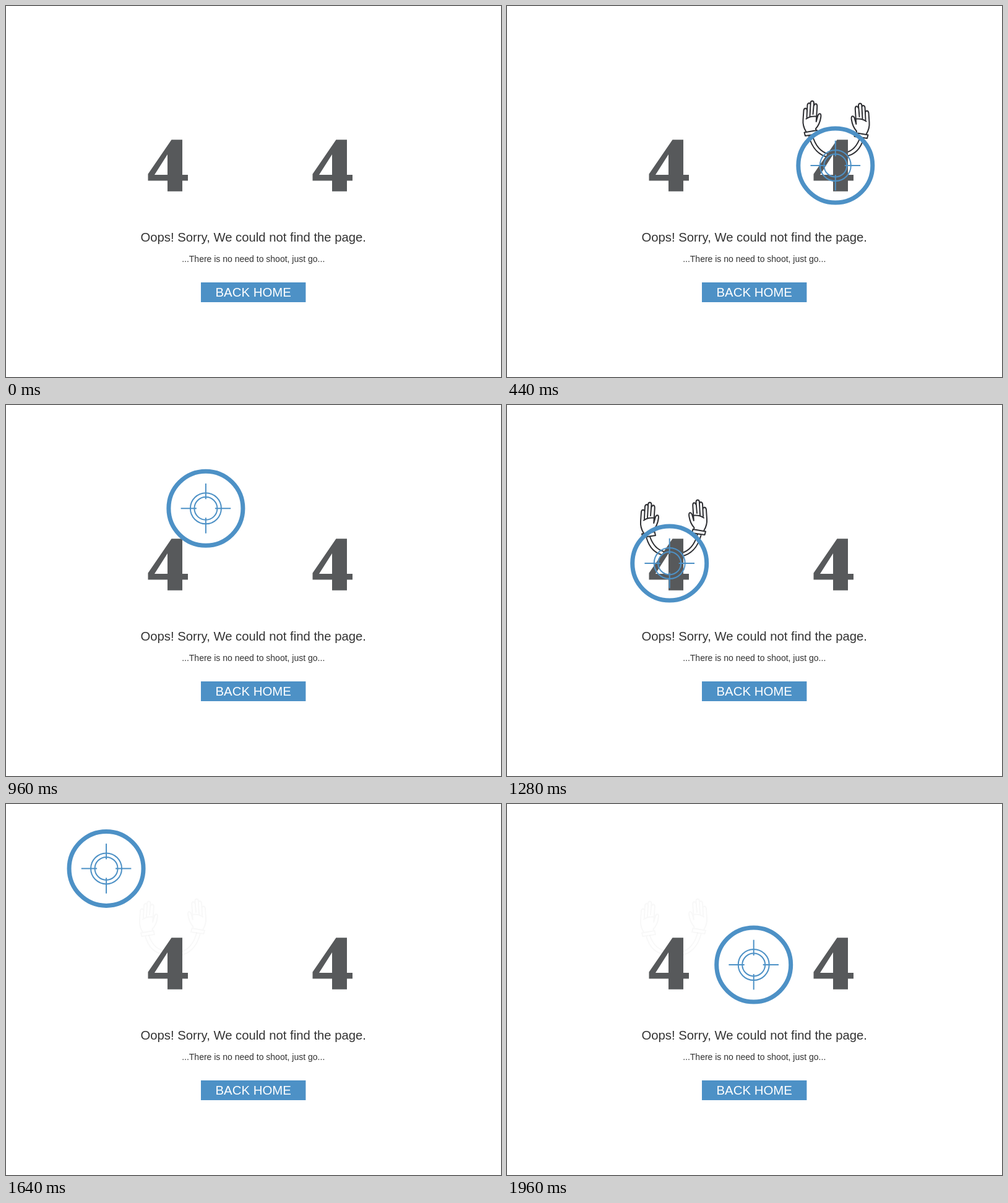
Write an HTML page with a canvas that moves like this. It is 800x600 px and loops after 4 s.

```html
<!DOCTYPE html>
<html lang="en">
<head>
<meta charset="utf-8">
<title>Page not found</title>
<style>
  html, body { margin: 0; width: 100%; height: 100%; overflow: hidden; background: #fff; }
  canvas { display: block; }
</style>
</head>
<body>
<canvas id="stage" width="800" height="600"></canvas>
<script>
const ctx = document.getElementById('stage').getContext('2d');
const LOOP = 4000, STEP = 40;
const BLUE = '#4d91c6', GREY = '#57595b', INK = '#2e2f33';
const FONT = '"Liberation Sans", Arial, sans-serif';

const four = new Path2D(
  'M267.5 216.3H285V273H294V282.5H285V299.8H261V282.5H229.5V271.8Z' +
  'M261 240L240 273H261Z');

const hand = new Path2D(
  'M483 202.5C479 196 478 190 478.5 184L479.5 169Q480 165.5 482.5 165.5Q485 166 485 169L484.5 180' +
  'M485 169L485.5 160Q486 157 488.5 157Q490.7 157.5 490.5 160L489.5 178' +
  'M490.5 160L490.7 156Q491.3 153.5 493.5 153.5Q496 154 496 157L494.5 175' +
  'M496 161Q497.5 157.7 499.5 158.2Q501.5 159 501.2 163L499.7 187' +
  'M483.5 182.5Q489 178 498.5 178.5' +
  'M499.7 187L502.5 177Q504 173.5 506.5 174.5Q508 176 507 181Q505.5 191 499 198.5L499.3 201' +
  'M480.5 204.5L501 201L502.5 207L482 210Z');

const arms = new Path2D(
  'M488 211C493 229 502 241 520 245M493.5 209C498 225 506 236 520 239.5' +
  'M576 215C572 229 564 240 548 243M570.5 213C566 226 559 234 548 237');

const clamp = v => Math.max(0, Math.min(1, v));
const span = (t, from, to) => clamp((t - from) / (to - from));
const smooth = u => u * u * (3 - 2 * u);

function bezier(p, s) {
  const r = 1 - s;
  const w = [r * r * r, 3 * r * r * s, 3 * r * s * s, s * s * s];
  return [0, 1].map(axis => w.reduce((sum, k, i) => sum + k * p[i][axis], 0));
}

// Returns a function giving the point at a fraction of the curve's length.
function track(points) {
  const N = 300, pts = [], len = [0];
  for (let i = 0; i <= N; i++) {
    pts.push(bezier(points, i / N));
    if (i) len.push(len[i - 1] + Math.hypot(pts[i][0] - pts[i - 1][0], pts[i][1] - pts[i - 1][1]));
  }
  return u => {
    const d = u * len[N];
    let i = 1;
    while (i < N && len[i] < d) i++;
    const k = clamp((d - len[i - 1]) / (len[i] - len[i - 1]));
    return [0, 1].map(a => pts[i - 1][a] + (pts[i][a] - pts[i - 1][a]) * k);
  };
}

const START = [697.5, 82.5], RIGHT = [530.8, 258], LEFT = [262.7, 256], CENTRE = [398.7, 260];
const toRight = track([START, START, RIGHT, RIGHT]);
const toLeft = track([RIGHT, [396, 44], [405, 44], LEFT]);
const toCentre = track([LEFT, [-220, 92], [580, -16], CENTRE]);

function scopeAt(t) {
  if (t < 454) return toRight(span(t, 40, 400));
  if (t < 1387) return toLeft(span(t, 454, 1130));
  return toCentre(smooth(span(t, 1387, 1960)));
}

function drawHands(alpha, mirrored) {
  if (alpha <= 0) return;
  ctx.save();
  ctx.globalAlpha = alpha;
  if (mirrored) ctx.transform(-1, 0, 0, 1, 801.5, 0);
  ctx.strokeStyle = INK;
  ctx.lineWidth = 2;
  ctx.lineCap = ctx.lineJoin = 'round';
  ctx.stroke(arms);
  ctx.stroke(hand);
  ctx.transform(-1, 0, 0, 1, 1064, 4);
  ctx.stroke(hand);
  ctx.restore();
}

function drawFour(dx) {
  ctx.save();
  ctx.translate(dx, 0);
  ctx.fillStyle = GREY;
  ctx.fill(four, 'evenodd');
  ctx.restore();
}

function ring(r, width) {
  ctx.lineWidth = width;
  ctx.beginPath();
  ctx.arc(0, 0, r, 0, Math.PI * 2);
  ctx.stroke();
}

function drawScope([x, y]) {
  ctx.save();
  ctx.translate(x, y);
  ctx.strokeStyle = BLUE;
  ring(60, 7);
  ring(25, 2);
  ring(18.5, 2);
  for (let i = 0; i < 4; i++) {
    ctx.beginPath();
    ctx.moveTo(15, 0);
    ctx.lineTo(40.3, 0);
    ctx.stroke();
    ctx.rotate(Math.PI / 2);
  }
  ctx.restore();
}

function label(text, y, size, color) {
  ctx.font = size + 'px ' + FONT;
  ctx.fillStyle = color;
  ctx.textAlign = 'center';
  ctx.fillText(text, 399.7, y);
}

function draw(t) {
  ctx.fillStyle = '#fff';
  ctx.fillRect(0, 0, 800, 600);

  drawHands(span(t, 240, 380) * (1 - span(t, 500, 660)), false);
  const rest = t >= 1400 ? 0.03 : 0;
  drawHands(Math.max(rest, span(t, 1060, 1200) * (1 - span(t, 1400, 1600))), true);

  drawFour(0);
  drawFour(266);
  if (t >= 40) drawScope(scopeAt(t));

  label('Oops! Sorry, We could not find the page.', 381, 20.3, '#333');
  label('...There is no need to shoot, just go...', 414, 14, '#333');
  ctx.fillStyle = BLUE;
  ctx.fillRect(315, 447, 169.4, 32);
  label('BACK HOME', 470, 20.4, '#fff');
}

const begin = performance.now();
function tick() {
  const t = (performance.now() - begin) % LOOP;
  draw(Math.floor(t / STEP) * STEP);
  requestAnimationFrame(tick);
}
tick();
</script>
</body>
</html>
```
